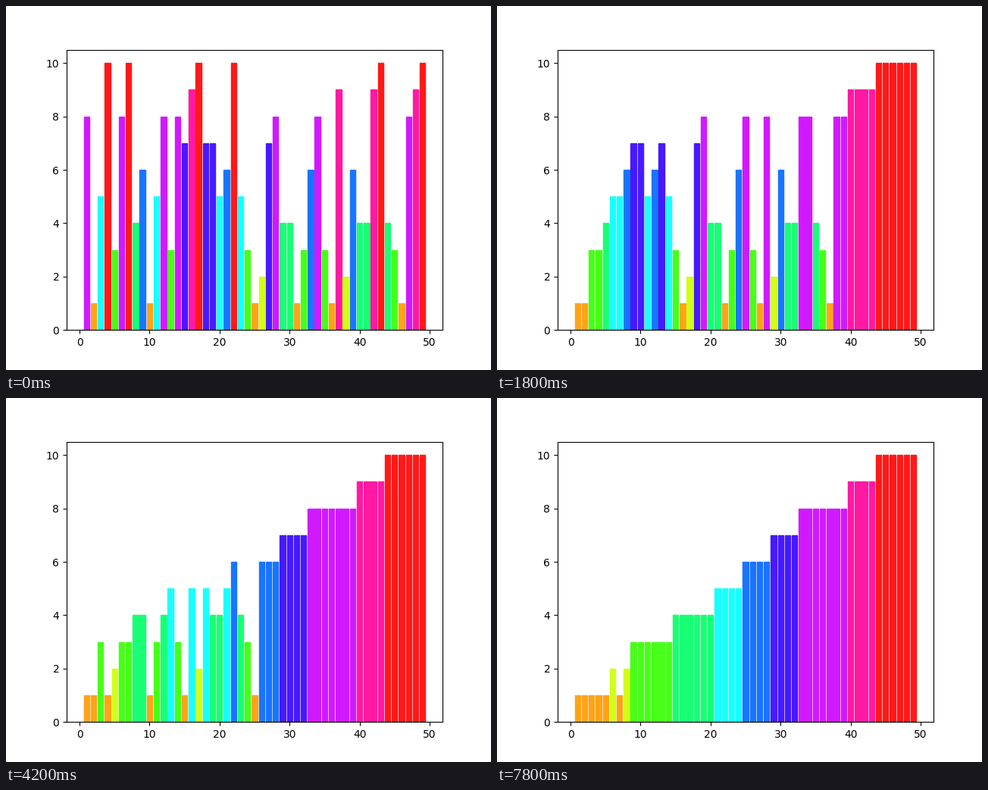
Animation, 640 px wide and 480 px high, one loop 8 s. Source, as a matplotlib script:

```python
import colorsys

import matplotlib.pyplot as plt
from matplotlib.animation import FuncAnimation

VALUES = [8, 1, 5, 10, 3, 8, 10, 4, 6, 1, 5, 8, 3, 8, 7, 9, 10,
          7, 7, 5, 6, 10, 5, 3, 1, 2, 7, 8, 4, 4, 1, 3, 6, 8,
          3, 1, 9, 2, 6, 4, 4, 9, 10, 4, 3, 1, 8, 9, 10]
FRAMES = 40
INTERVAL = 200


def color_of(value):
    return colorsys.hsv_to_rgb(value / 10, 0.9, 1.0)


def bubble_passes(values, passes):
    """Return the list after the given number of bubble sort passes."""
    out = list(values)
    for done in range(passes):
        for i in range(len(out) - 1 - done):
            if out[i] > out[i + 1]:
                out[i], out[i + 1] = out[i + 1], out[i]
    return out


fig, ax = plt.subplots(figsize=(6.4, 4.8), dpi=100)
bars = ax.bar(range(1, len(VALUES) + 1), VALUES)


def update(frame):
    for bar, value in zip(bars, bubble_passes(VALUES, frame)):
        bar.set_height(value)
        bar.set_color(color_of(value))  # fill and edge alike
    return list(bars)


anim = FuncAnimation(fig, update, frames=FRAMES, interval=INTERVAL,
                     init_func=lambda: update(0), repeat=True,
                     repeat_delay=0, blit=False)
plt.show()
```
